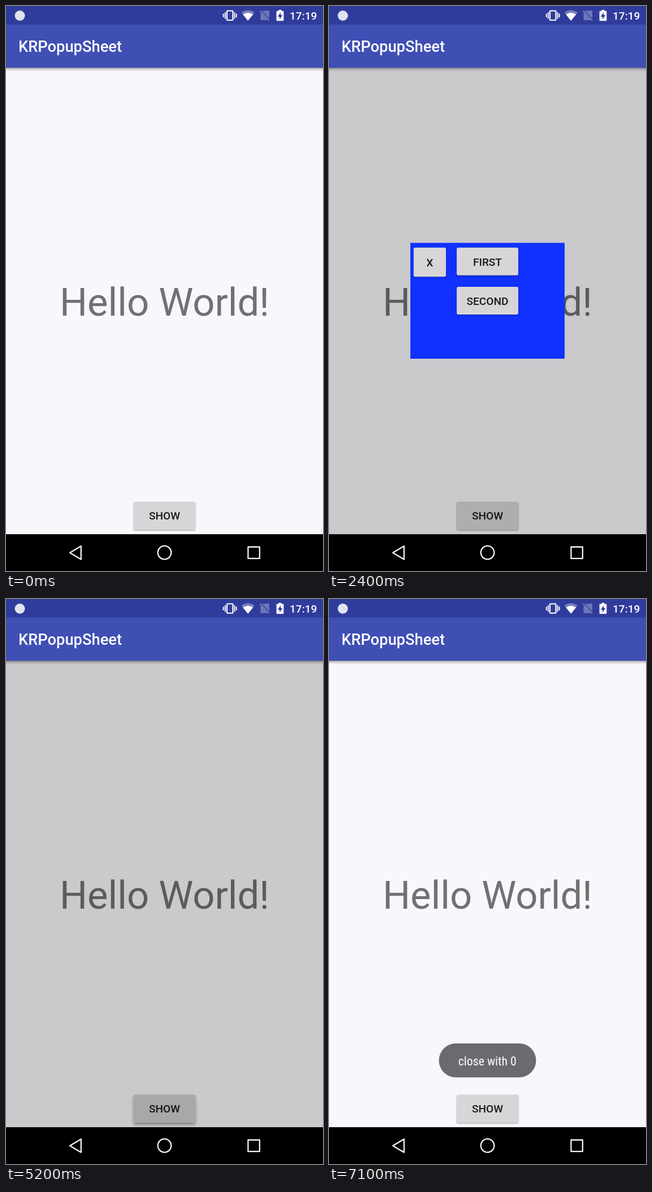
An HTML page that plays this animation: 561x998 px, repeating every 7.3 s.

```html
<!DOCTYPE html>
<html lang="en">
<head>
<meta charset="utf-8">
<title>Popup demo</title>
<style>
  html, body { margin: 0; width: 100%; height: 100%; overflow: hidden; background: #000; }
  svg { display: block; width: 100%; height: 100%; }
  text { font-family: Roboto, sans-serif; }
  .label { font-size: 19.1px; font-weight: 500; fill: #19191a; text-anchor: middle; }
  .toast { font-family: "Roboto Condensed", Roboto, sans-serif; font-stretch: condensed; font-size: 21.8px; fill: #fff; text-anchor: middle; }
</style>
</head>
<body>
<svg viewBox="0 0 561 998" xmlns="http://www.w3.org/2000/svg">
  <defs>
    <linearGradient id="fall" x1="0" y1="0" x2="0" y2="1">
      <stop offset="0" stop-opacity=".36"/>
      <stop offset=".45" stop-opacity=".12"/>
      <stop offset="1" stop-opacity="0"/>
    </linearGradient>
  </defs>

  <rect width="561" height="998" fill="#f9f7fb"/>
  <text x="280.5" y="547" font-size="68.8" fill="#717073" text-anchor="middle">Hello World!</text>
  <g id="show"></g>
  <rect id="dim" y="109" width="561" height="824"/>

  <g id="dialog">
    <rect width="273" height="204.6" fill="#1031ff"/>
    <g id="close"></g>
    <g id="first"></g>
    <g id="second"></g>
  </g>

  <g id="toast">
    <rect x="194.5" y="785" width="172" height="60" rx="30" fill="#656367"/>
    <text class="toast" x="280.3" y="824">close with 0</text>
  </g>

  <rect y="109" width="561" height="7" fill="url(#fall)"/>
  <rect y="32" width="561" height="77" fill="#3f4fb4"/>
  <rect width="561" height="32.6" fill="#303c9b"/>
  <text x="22" y="81" font-size="27.3" font-weight="500" fill="#fff">KRPopupSheet</text>

  <g fill="#fff">
    <circle cx="24.5" cy="17" r="9" fill="#dfe3f0"/>
    <rect x="391" y="8.5" width="10.5" height="16.5" rx="1" fill="none" stroke="#fff" stroke-width="2.2"/>
    <path d="M384.8 13.5v6.5M387.9 11v11.5M404.6 11v11.5M407.7 13.5v6.5" stroke="#fff" stroke-width="1.9"/>
    <path d="M416.5 11.5Q428 3.5 440 11.5L428.2 26Z" opacity=".35"/>
    <path d="M419.3 15Q428.2 9 437.1 15L428.2 26Z"/>
    <path d="M466 8V22L452.5 8.5ZM450.5 11L464 25H450.5Z" opacity=".3"/>
    <path d="M449.5 8.5L466 25.5" stroke="#fff" stroke-width="1.6" opacity=".4"/>
    <path d="M482.5 6.8h5v2h2.7q1.2 0 1.2 1.2v15q0 1.2-1.2 1.2h-10.4q-1.2 0-1.2-1.2v-15q0-1.2 1.2-1.2h2.7z"/>
    <path d="M486 11l-5 8h3.2v5l5-8H486z" fill="#303c9b"/>
    <text x="502" y="23.8" font-size="19.1" font-weight="500">17:19</text>
  </g>

  <rect y="933" width="561" height="65"/>
  <g fill="none" stroke="#f4f4f4" stroke-width="2.3" stroke-linejoin="round">
    <path d="M113 965.7L132.8 954V977.4Z"/>
    <circle cx="280.5" cy="965.5" r="11.8"/>
    <rect x="428.4" y="955.5" width="20.4" height="20.4"/>
  </g>
</svg>
<script>
const LOOP = 7300, STEP = 100;
const el = id => document.getElementById(id);

function button(id, label, x, y, w, h, base) {
  el(id).innerHTML =
    `<rect class="face" x="${x}" y="${y}" width="${w}" height="${h}" rx="2.7" fill="#d7d5d8"/>` +
    `<rect class="ink" x="${x}" y="${y}" width="${w}" height="${h}" rx="2.7" opacity="0"/>` +
    `<text class="label" x="${x + w / 2}" y="${base}">${label}</text>`;
  setPress(id, 0, 0);
}

function setPress(id, lift, ink) {
  el(id).querySelector(".face").style.filter =
    `drop-shadow(0 ${1.3 + 1.7 * lift}px ${1.1 + 1.7 * lift}px rgba(0,0,0,.38))`;
  el(id).querySelector(".ink").setAttribute("opacity", ink);
}

// Linear interpolation through [time, value] points.
function track(t, points) {
  let [t0, v0] = points[0];
  for (const [t1, v1] of points) {
    if (t < t1) return t <= t0 ? v0 : v0 + (v1 - v0) * (t - t0) / (t1 - t0);
    t0 = t1;
    v0 = v1;
  }
  return v0;
}

function bounce(p) {
  if (p <= 0) return 0;
  if (p >= 1) return 1;
  const t = p * 1.1226, arc = (c, low) => 8 * (t - c) ** 2 + low;
  if (t < 0.3535) return arc(0, 0);
  if (t < 0.7408) return arc(0.54719, 0.7);
  if (t < 0.9644) return arc(0.8526, 0.9);
  return arc(1.0435, 0.95);
}

const ease = p => 0.5 - Math.cos(Math.PI * Math.min(1, Math.max(0, p))) / 2;

const OPEN = 540, CLOSE = 300;
const shows = [{ open: 1349, close: 2520 }, { open: 5450, close: 6620 }];

const DIM = [[1200, 0], [1400, .19], [2750, .19], [2950, 0],
  [5000, 0], [5200, .19], [6800, .19], [7000, 0]];
const TOAST = [[2800, 0], [3050, 1], [4650, 1], [4950, 0], [6850, 0], [7100, .95]];
const SHOW_LIFT = [[1150, 0], [1250, 1], [1350, 1], [1480, 0],
  [5000, 0], [5100, 1], [5200, 1], [5350, 0]];
const SHOW_INK = [[1150, 0], [1400, .08], [1500, .075], [1800, 0],
  [5000, 0], [5100, .06], [5200, .035], [5400, 0]];
const X_LIFT = [[2390, 0], [2500, 1], [2600, 1], [2700, 0],
  [6510, 0], [6600, 1], [6680, 1], [6780, 0]];

function dialogScale(t) {
  const s = shows.find(s => t >= s.open && t < s.close + CLOSE);
  if (!s) return 0;
  return t < s.close ? bounce((t - s.open) / OPEN) : 1 - ease((t - s.close) / CLOSE);
}

function draw(t) {
  const scale = dialogScale(t), xLift = track(t, X_LIFT);
  el("dim").setAttribute("opacity", track(t, DIM));
  el("toast").setAttribute("opacity", track(t, TOAST));
  el("dialog").setAttribute("transform", `translate(144 418.4) scale(1 ${scale})`);
  el("dialog").setAttribute("visibility", scale > 0 ? "visible" : "hidden");
  setPress("show", track(t, SHOW_LIFT), track(t, SHOW_INK));
  setPress("close", xLift, xLift * .02);
}

button("show", "SHOW", 226, 875.8, 109, 49.4, 907.4);
button("close", "X", 5.7, 8.3, 57.3, 51.6, 41.2);
button("first", "FIRST", 82, 8.3, 109, 49, 40.2);
button("second", "SECOND", 82, 77.6, 109, 49, 109.4);

const start = performance.now();
function tick() {
  const t = (performance.now() - start) % LOOP;
  draw(Math.floor(t / STEP) * STEP);
  requestAnimationFrame(tick);
}
tick();
</script>
</body>
</html>
```
